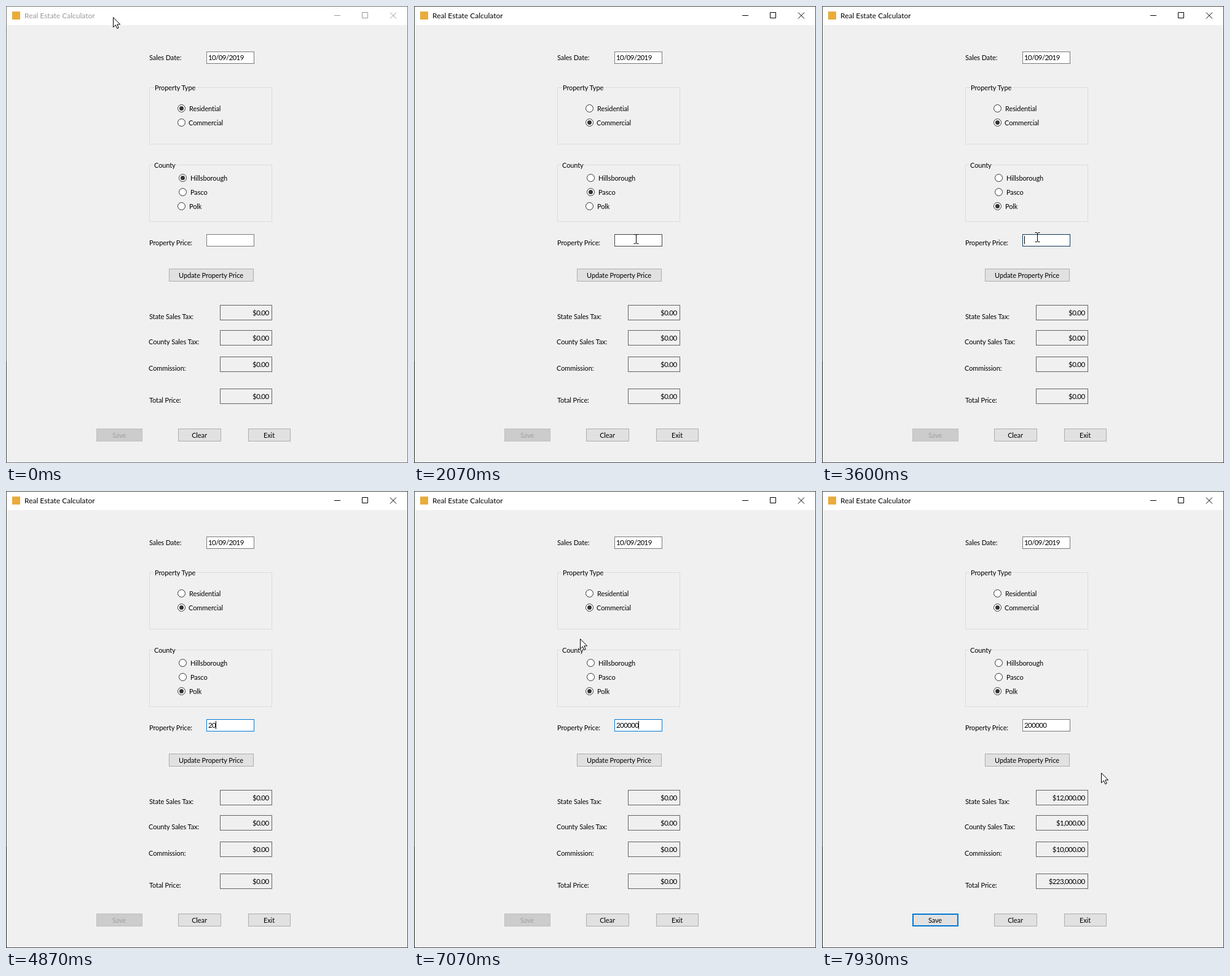
An HTML page for the animation above (8 s loop, 654 by 743 pixels).

```html
<!DOCTYPE html>
<html lang="en">
<head>
<meta charset="utf-8">
<title>Real Estate Calculator</title>
<style>
html, body { margin: 0; width: 654px; height: 743px; overflow: hidden; background: #f0f0f0; }
svg { display: block; }
text { font: 11px Lato, "Open Sans", sans-serif; letter-spacing: -.1px; fill: #000; white-space: pre; }
text.title { font-size: 12px; letter-spacing: 0; }
text.num { font-size: 11.5px; letter-spacing: -.6px; }
rect { shape-rendering: crispEdges; }
</style>
</head>
<body>
<script>
const NS = 'http://www.w3.org/2000/svg';
const LOOP = 8000, STEP = 1000 / 15;

function add(tag, attrs, parent = svg) {
  const el = document.createElementNS(NS, tag);
  set(el, attrs);
  parent.append(el);
  return el;
}
function set(el, attrs) {
  for (const k in attrs) el.setAttribute(k, attrs[k]);
}
const svg = document.createElementNS(NS, 'svg');
set(svg, { width: 654, height: 743, viewBox: '0 0 654 743' });
document.body.append(svg);

const fillRect = (x, y, width, height, fill) => add('rect', { x, y, width, height, fill });
const box = (x, y, w, h, fill, stroke) =>
  add('rect', { x: x + .5, y: y + .5, width: w - 1, height: h - 1, fill, stroke });
function label(str, x, y, cls = '', anchor = 'start') {
  const el = add('text', { x, y, class: cls, 'text-anchor': anchor });
  el.textContent = str;
  return el;
}
function button(str, x, y, w) {
  return { face: box(x, y, w, 21, '#e1e1e1', '#adadad'),
           text: label(str, x + w / 2 - .5, y + 15, '', 'middle') };
}
function group(str, x, y, gap) {
  box(233, y, 200, 93, 'none', '#dcdcdc');
  fillRect(x - 2, y, gap, 1, '#f0f0f0');
  label(str, x, y + 5);
}
function radio(str, x, y, tx) {
  const ring = add('circle', { cx: x, cy: y, r: 6, fill: '#fff', stroke: '#333' });
  const dot = add('circle', { cx: x, cy: y, r: 3.5, fill: '#333' });
  label(str, tx, y + 4.5);
  return { ring, dot, x, y };
}

// window frame
fillRect(0, 0, 654, 743, '#f0f0f0');
fillRect(0, 0, 654, 31, '#fff');
const frame = box(0, 0, 654, 743, 'none', '#777');
const edge = fillRect(0, 578, 1, 165, '#333');
fillRect(10, 9, 13, 13, '#e9ac3c');
const title = label('Real Estate Calculator', 30, 20, 'title');
const controls = add('path', {
  d: 'M534 15.5H544M579.5 10.5h9v9h-9zM625 10.5l10 10M635 10.5l-10 10', fill: 'none' });

// form
label('Sales Date:', 233, 88);
box(326, 74, 78, 20, '#fff', '#7a7a7a');
label('10/09/2019', 329, 88, 'num');

group('Property Type', 242, 132, 69);
const types = [radio('Residential', 285.5, 166.5, 298), radio('Commercial', 285.5, 189.5, 297)];
group('County', 241, 258, 37);
const counties = [radio('Hillsborough', 287.5, 279.5, 300), radio('Pasco', 287.5, 302.5, 300),
                  radio('Polk', 285.5, 325.5, 298)];

label('Property Price:', 233, 389);
const field = box(326, 371, 78, 20, '#fff', '#7a7a7a');
const price = label('', 329, 385, 'num');
const caret = fillRect(329, 374, 1, 13, '#000');
const update = button('Update Property Price', 265, 427, 138);

const results = [
  ['State Sales Tax:', 233, 486, '$12,000.00'],
  ['County Sales Tax:', 232, 527, '$1,000.00'],
  ['Commission:', 232, 570, '$10,000.00'],
  ['Total Price:', 233, 622, '$223,000.00']
].map(([str, x, y, sum]) => {
  label(str, x, y + 23);
  box(348, y, 85, 25, '#f0f0f0', '#646464');
  return { out: label('$0.00', 427.5, y + 17, 'num', 'end'), sum };
});

const save = button('Save', 147, 687, 75);
const focus = add('rect', { x: 148, y: 688, width: 73, height: 19, fill: 'none',
                            stroke: '#0078d7', 'stroke-width': 2 });
button('Clear', 280, 687, 70);
button('Exit', 394, 687, 69);

// pointers
const arrow = add('path', { d: 'M.5.5V16.5L4.3 12.9L6.8 18.5L9.2 17.5L6.8 11.9H11.7Z',
                            fill: '#fff', stroke: '#000' });
const beam = add('path', { d: 'M-3.5-7.5H-1L.5-6.5L2-7.5H4.5M.5-6.5V6.5M-3.5 7.5H-1L.5 6.5L2 7.5H4.5',
                           fill: 'none', stroke: '#000' });

// time, x, y
const path = [
  [0, 174, 18], [133, 232, 62], [267, 335, 140], [333, 364, 168], [400, 338, 182],
  [1000, 338, 182], [1200, 285, 301], [1467, 285, 302], [1600, 290, 308], [1867, 337, 361],
  [1933, 362, 389], [2000, 362, 389], [2067, 361, 379], [2400, 358, 380], [2667, 352, 377],
  [2867, 340, 360], [3000, 310, 342], [3133, 286, 325], [3333, 286, 325], [3467, 330, 360],
  [3533, 350, 376], [3667, 350, 376], [3733, 430, 420], [3800, 492, 446], [6532, 492, 446],
  [6533, 303, 364], [6733, 220, 202], [6800, 220, 202], [6867, 212, 188], [6933, 209, 180],
  [7133, 300, 270], [7333, 490, 452], [7600, 380, 444], [7733, 380, 444], [7933, 454, 458]
];
const keyTimes = [4600, 4867, 5000, 5133, 5267, 5800];
const within = (t, a, b) => t >= a - 3 && t < b - 3;
const mix = (a, b, p) => {
  p = Math.min(1, Math.max(0, p));
  return `rgb(${a.map((v, i) => Math.round(v + (b[i] - v) * p))})`;
};
const GREY = [122, 122, 122], DARK = [23, 23, 23], BLUE = [0, 120, 215];

function pointerAt(t) {
  const i = path.findIndex(p => p[0] > t);
  if (i < 0) return path[path.length - 1].slice(1);
  const [t0, x0, y0] = path[i - 1], [t1, x1, y1] = path[i];
  const p = (t - t0) / (t1 - t0);
  return [Math.round(x0 + (x1 - x0) * p), Math.round(y0 + (y1 - y0) * p)];
}
function fieldColor(t) {
  if (within(t, 1933, 2867)) return mix(GREY, DARK, (t - 1933) / 267);
  if (within(t, 2867, 3467)) return mix(DARK, GREY, (t - 2867) / 267);
  if (within(t, 3467, 3533)) return mix(GREY, DARK, .7);
  if (within(t, 3533, 7733)) return mix(DARK, BLUE, (t - 3533) / 200);
  return mix(GREY, GREY, 0);
}
function drawRadios(list, chosen, mx, my, down) {
  list.forEach((r, i) => {
    const hot = mx >= r.x - 7 && mx < r.x + 74 && Math.abs(my - r.y) < 9;
    const color = hot ? (down ? '#005499' : '#0078d7') : '#333';
    set(r.ring, { stroke: color, fill: hot && down ? '#cce4f7' : '#fff' });
    set(r.dot, { fill: color, visibility: i === chosen ? 'visible' : 'hidden' });
  });
}

function draw(time) {
  const t = Math.floor((time + 4) / STEP) * STEP;
  const since = at => t >= at - 3;
  const [mx, my] = pointerAt(t);

  const active = since(667);
  title.style.fill = active ? '#000' : '#999';
  set(controls, { stroke: active ? '#000' : '#999' });
  set(frame, { stroke: active ? '#4a4a4a' : '#777' });
  set(edge, { fill: active ? '#222' : '#444' });

  const down = within(t, 667, 1067) || within(t, 1333, 1467) || within(t, 3200, 3333);
  drawRadios(types, since(1067) ? 1 : 0, mx, my, down);
  drawRadios(counties, since(3333) ? 2 : since(1467) ? 1 : 0, mx, my, down);

  const count = keyTimes.filter(since).length;
  const typed = '200000'.slice(0, count);
  if (price.textContent !== typed) price.textContent = typed;
  set(field, { stroke: fieldColor(t) });
  const blink = within(t, 3533, 4267) || within(t, 4600, 6333) || within(t, 6867, 7400);
  set(caret, { x: 329 + count * 6, visibility: blink ? 'visible' : 'hidden' });

  const over = mx >= 265 && mx < 403 && my >= 427 && my < 448;
  const press = over && since(7667) && !since(7800);
  set(update.face, { fill: press ? '#cce4f7' : over ? '#e5f1fb' : '#e1e1e1',
                     stroke: press ? '#005499' : over ? '#0078d7' : '#adadad' });

  const done = since(7800);
  for (const r of results) {
    const str = done ? r.sum : '$0.00';
    if (r.out.textContent !== str) r.out.textContent = str;
  }
  set(save.face, { fill: done ? '#e1e1e1' : '#ccc', stroke: done ? '#0078d7' : '#bfbfbf' });
  save.text.style.fill = done ? '#000' : '#a0a0a0';
  set(focus, { visibility: done ? 'visible' : 'hidden' });

  const shown = !within(t, 4600, 6533);
  const inField = mx >= 326 && mx < 404 && my >= 371 && my < 388;
  set(arrow, { transform: `translate(${mx} ${my})`, visibility: shown && !inField ? 'visible' : 'hidden' });
  set(beam, { transform: `translate(${mx} ${my})`, visibility: shown && inField ? 'visible' : 'hidden' });
}

const start = performance.now();
function tick() {
  draw((performance.now() - start) % LOOP);
  requestAnimationFrame(tick);
}
draw(0);
requestAnimationFrame(tick);
</script>
</body>
</html>
```
